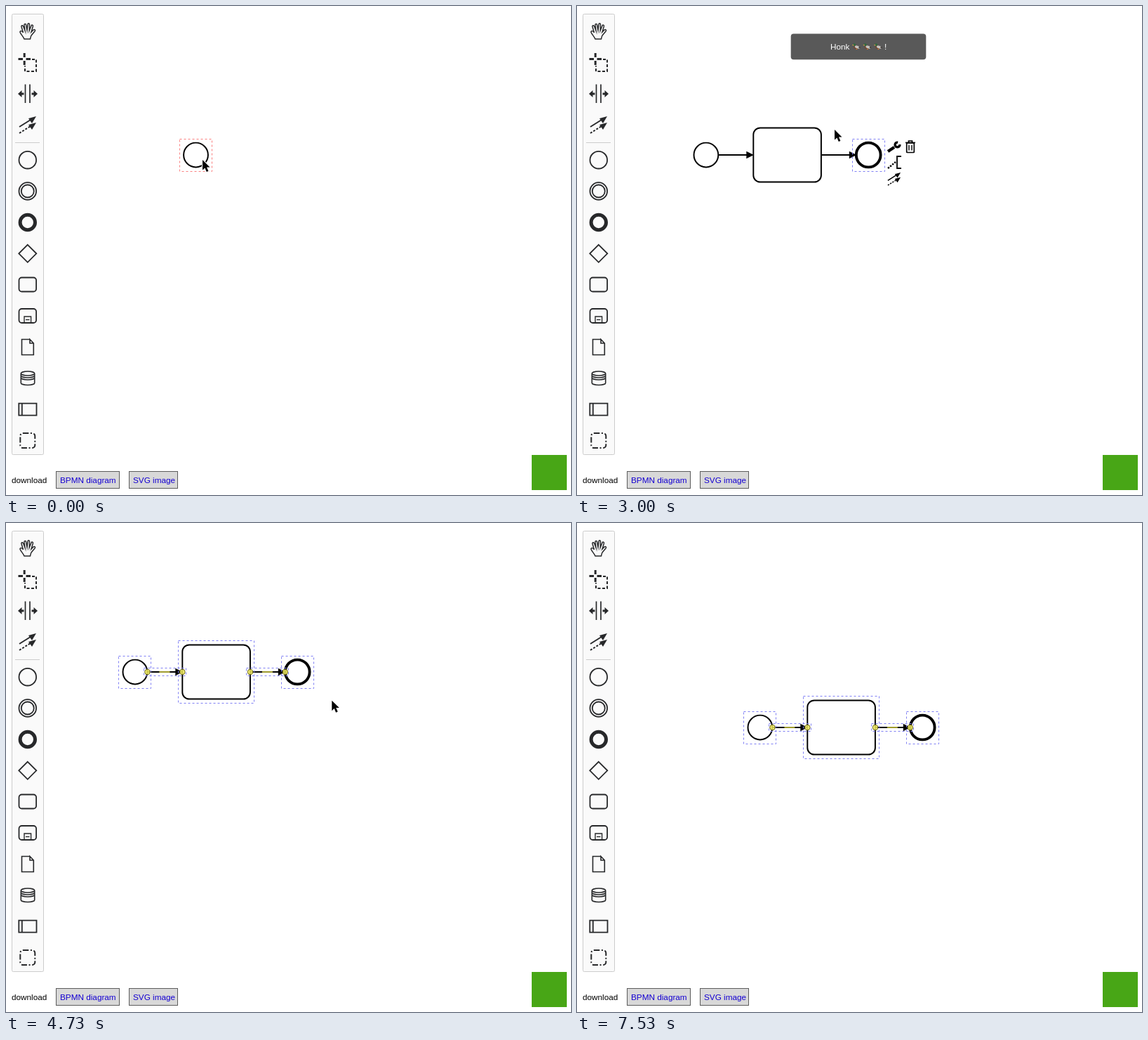
An HTML page with a canvas that plays this animation: 805x696 px, repeating every 7.99 s.

```html
<!DOCTYPE html>
<html lang="en">
<head>
<meta charset="utf-8">
<title>Diagram editor</title>
<style>
  html, body { margin: 0; width: 100%; height: 100%; overflow: hidden; background: #fff; }
  body { font: 11.75px/14px "Liberation Sans", Arial, sans-serif; }
  canvas { position: absolute; left: 0; top: 0; }
  span { position: absolute; white-space: pre; }
  .link { box-sizing: border-box; top: 662px; height: 25px; line-height: 23px; padding-left: 5px;
    border: 1px solid #5c5c5c; background: #d8d8d8; color: #1500d2; }
  .toast { color: #fff; top: 51px; }
</style>
</head>
<body>
<canvas id="stage" width="805" height="696"></canvas>
<span style="left:8px;top:668px">download</span>
<span class="link" style="left:71px;width:91px">BPMN diagram</span>
<span class="link" style="left:175px;width:70px">SVG image</span>
<span class="toast" style="left:361px">Honk</span>
<span class="toast" style="left:438px">!</span>
<script>
const ctx = document.getElementById('stage').getContext('2d');
const toastText = document.querySelectorAll('.toast');
const LOOP = 7990, STEP = 1000 / 15;
const INK = '#27282a', ORANGE = '#f46908', RED = '#fb8080', BLUE = '#8080f4';
const START = { x: 183.9, y: 212, w: 23, h: 23 };
const TASK = { x: 299.6, y: 212, w: 54, h: 44.3 };
const END = { x: 415.2, y: 212, w: 23, h: 23 };

// time, x, y of the pointer; a trailing 1 means constant speed into that point
const TRACK = [
  [0, 280, 219], [60, 280, 219], [610, 187, 222], [980, 187, 222], [1670, 270, 203],
  [2250, 270, 203], [2730, 367, 176], [3640, 367, 176], [3960, 117, 117],
  [4060, 150, 130, 1], [4272, 399, 233, 1], [4338, 443, 248, 1], [4470, 486, 257, 1],
  [4600, 486, 257], [5200, 325, 225], [5405, 354, 256, 1], [5670, 402, 304, 1], [LOOP, 402, 304]
];

function pointerAt(t) {
  const i = Math.max(1, TRACK.findIndex(p => p[0] >= t));
  const a = TRACK[i - 1], b = TRACK[i];
  let p = (t - a[0]) / (b[0] - a[0]);
  if (!b[3]) p = p * p * (3 - 2 * p);
  return { x: a[1] + (b[1] - a[1]) * p, y: a[2] + (b[2] - a[2]) * p };
}

function pen(color, width = 2, dash = []) {
  ctx.strokeStyle = ctx.fillStyle = color;
  ctx.lineWidth = width;
  ctx.setLineDash(dash);
}

function lines(...pts) {
  ctx.beginPath();
  for (let i = 0; i < pts.length; i += 2) ctx.lineTo(pts[i], pts[i + 1]);
}

function line(...pts) { lines(...pts); ctx.stroke(); }

function poly(...pts) { lines(...pts); ctx.closePath(); ctx.fill(); }

function circle(x, y, r) {
  ctx.beginPath();
  ctx.arc(x, y, r, 0, 7);
  ctx.stroke();
}

function box(x, y, w, h, r = 0) {
  ctx.beginPath();
  ctx.roundRect(x, y, w, h, r);
  ctx.stroke();
}

function diamond(x, y, r) {
  lines(x, y - r, x + r, y, x, y + r, x - r, y);
  ctx.closePath();
  ctx.stroke();
}

function at(x, y, draw, scale = 1) {
  ctx.save();
  ctx.translate(x, y);
  ctx.scale(scale, scale);
  draw();
  ctx.restore();
}

/* icons */
const handPath = new Path2D('M7 23C6 20 1 15 1 13C1 11 4 11 5.5 14L3 5.5C2.5 3.5 5 3 5.7 5L8 11L7 3C6.8 1 9.3 .8 9.6 2.8L11 10.5L12 2C12.2 .2 14.6 .4 14.5 2.2L14.2 11L17 4C17.7 2.3 20 3 19.4 5L17 13L20 10C21.5 8.8 23.5 10 22 12L17 18C16 20 16 21 15.5 23Z');

function connectIcon(color) {
  pen(color, 2);
  line(-12, 3, 4, -7);
  poly(12, -12, 6, -2, 1, -9);
  pen(color, 2, [3, 2]);
  line(-12, 12, 4, 2);
  poly(12, -3, 6, 7, 1, 0);
}

function annotationIcon() {
  pen('#000', 1.8);
  line(10, -9, 4, -9, 4, 8, 10, 8);
  pen('#000', 2.4, [2.4, 1.6]);
  line(-9, 8, 2, -1);
}

function wrenchIcon() {
  pen('#000', 4.2);
  line(-9, 7, 0, 1);
  pen('#000', 3.4);
  ctx.beginPath();
  ctx.arc(4.5, -2.5, 3.4, -0.1, 4.9);
  ctx.stroke();
}

function trashIcon() {
  pen('#000', 1.7);
  line(-7, -5.5, 7, -5.5);
  line(-2.5, -6, -2.5, -8, 2.5, -8, 2.5, -6);
  box(-5.3, -5, 10.6, 13.5, 1);
  pen('#000', 1.4);
  for (const x of [-2, 2]) line(x, -2, x, 5.5);
}

function pad(x, y, full) {
  const row = full ? 23 : 0;
  if (full) {
    pen('#000', 3.6); circle(x, y, 7.9);
    pen('#000', 1.4); diamond(x + 23, y, 9.3);
    box(x + 37, y - 7.5, 18, 15, 3);
    circle(x, y + 23, 9); circle(x, y + 23, 6.4);
    at(x + 23, y + 23.5, annotationIcon);
  } else {
    at(x, y + 23, annotationIcon);
  }
  at(x, y + 2 * row, wrenchIcon);
  at(x + 23, y + 2 * row, trashIcon);
  at(x, y + (full ? 69 : 46), () => connectIcon('#000'), 0.76);
}

function palette(lassoOn) {
  ctx.fillStyle = '#fafafa';
  ctx.fillRect(8, 11, 46, 628);
  pen('#ccc', 1);
  box(8.5, 11.5, 45, 627, 2);
  line(13, 194.5, 48, 194.5);

  pen(INK, 1.5);
  at(19, 24, () => ctx.stroke(handPath));

  const c = lassoOn ? ORANGE : INK;
  pen(c, 3);
  line(17.5, 75.5, 24, 75.5); line(28.5, 75.5, 35, 75.5);
  line(26.2, 67, 26.2, 73); line(26.2, 78, 26.2, 84);
  pen(c, 2, [4, 2.5]);
  line(37, 76, 43, 76, 43, 93, 27, 93, 27, 85);

  pen(INK, 1.7);
  line(27.5, 111.5, 27.5, 138); line(34, 111.5, 34, 138);
  pen(INK, 3);
  line(21, 125, 25.5, 125); line(36.5, 125, 41, 125);
  poly(17, 125, 22.5, 120, 22.5, 130);
  poly(45, 125, 39.5, 120, 39.5, 130);

  at(31, 169, () => connectIcon(INK));

  pen(INK, 1.8);
  circle(30.8, 219.2, 12.3);
  circle(30.8, 263.5, 12.3);
  circle(30.8, 263.5, 9);
  diamond(30.8, 352.3, 12.5);
  box(18.5, 386.5, 24.6, 20, 4);
  box(18.5, 431, 24.6, 20, 4);
  pen(INK, 1.4);
  box(26, 442, 9.6, 9);
  line(28, 446.5, 33.5, 446.5);
  pen(INK, 5);
  circle(30.8, 308, 10.7);

  pen(INK, 1.6);
  line(34, 474.5, 22.5, 474.5, 22.5, 496.5, 39.3, 496.5, 39.3, 480, 34, 474.5, 34, 480, 39.3, 480);

  ctx.beginPath();
  ctx.ellipse(31, 523, 9.7, 3, 0, 0, 7);
  ctx.moveTo(21.3, 523);
  ctx.lineTo(21.3, 536.5);
  ctx.ellipse(31, 536.5, 9.7, 3, 0, Math.PI, 0, true);
  ctx.lineTo(40.7, 523);
  for (const y of [526, 529]) {
    ctx.moveTo(21.3, y);
    ctx.ellipse(31, y, 9.7, 3, 0, Math.PI, 0, true);
  }
  ctx.stroke();

  pen(INK, 1.8);
  box(18.3, 565.7, 25.2, 17);
  line(22.8, 565.7, 22.8, 582.7);
  pen(INK, 2, [8, 2.6, 2, 2.6]);
  box(20.3, 608, 21, 21, 4);
}

/* diagram */
function flow(x1, x2, y) {
  line(x1, y, x2 - 6, y);
  poly(x2 + .5, y, x2 - 10, y - 5.3, x2 - 10, y + 5.3);
}

function shapes(count, color, dx = 0, dy = 0, filled = true) {
  const y = 212 + dy;
  const paint = width => {
    pen(color, width);
    if (!filled) return;
    ctx.fillStyle = '#fff';
    ctx.fill();
  };
  const outlineCircle = (x, width) => {
    ctx.beginPath();
    ctx.arc(x, y, 17.4, 0, 7);
    paint(width);
    ctx.stroke();
  };
  outlineCircle(START.x + dx, 1.95);
  if (count > 1) {
    ctx.beginPath();
    ctx.roundRect(251.3 + dx, 173.4 + dy, 96.6, 77.2, 9.7);
    paint(1.95);
    ctx.stroke();
    pen(color, 1.95);
    flow(201.5 + dx, 251.3 + dx, y);
  }
  if (count > 2) {
    outlineCircle(END.x + dx, 3.9);
    pen(color, 1.95);
    flow(348 + dx, 397.8 + dx, y);
  }
}

function frame(el, color, dx = 0, dy = 0) {
  const x = Math.floor(el.x + dx - el.w) + .5, y = Math.floor(el.y + dy - el.h) + .5;
  pen(color, 1, [3, 3]);
  box(x, y, Math.round(el.w * 2), Math.round(el.h * 2));
}

function inside(el, p, inset = 0) {
  return Math.abs(p.x - el.x) <= el.w - inset && Math.abs(p.y - el.y) <= el.h - inset;
}

function selectAll(p, dx, dy, hover) {
  const local = { x: p.x - dx, y: p.y - dy };
  const y = 212 + dy;
  for (const [a, b] of [[201.5, 251.3], [348, 397.8]]) {
    frame({ x: (a + b) / 2, y: 212, w: 30, h: 5.6 }, BLUE, dx, dy);
    pen('#c9c43c', 1.6);
    line((a + b) / 2 + dx - 8, y, (a + b) / 2 + dx + 7, y);
    for (const x of [a, b]) {
      pen('#6e6a24', 1);
      ctx.beginPath();
      ctx.arc(x + dx, y, 3.8, 0, 7);
      ctx.fillStyle = 'rgba(240,234,90,.85)';
      ctx.fill();
      ctx.stroke();
    }
  }
  for (const el of [START, TASK, END])
    frame(el, hover && inside(el, local, 5) ? RED : BLUE, dx, dy);
}

function textBox() {
  ctx.fillStyle = '#fff';
  ctx.fillRect(252, 174, 96, 76);
  pen('#ccc', 1);
  box(252.5, 174.5, 95, 75);
  pen('#000', 1);
  line(300.5, 206, 300.5, 218.5);
}

function toast() {
  ctx.fillStyle = '#595959';
  ctx.beginPath();
  ctx.roundRect(304.7, 39.6, 192.6, 36.6, 4);
  ctx.fill();
  for (const x of [398, 413.5, 429]) at(x, 57.5, duck);
}

function duck() {
  const blob = (color, x, y, w, h) => {
    ctx.fillStyle = color;
    ctx.beginPath();
    ctx.ellipse(x, y, w, h, .25, 0, 7);
    ctx.fill();
  };
  blob('#6d4a38', -1, 1.2, 3, 2.4);
  blob('#c9c5c0', 1.4, 1, 3.6, 1.9);
  blob('#35302e', 4.4, 1.4, 1.3, .9);
  blob('#2f6b3f', -2.6, -2.4, 1.7, 1.7);
  blob('#d8a83c', -4.7, -1.8, 1.1, .6);
  blob('#e07a2c', .4, 3.9, 1, .6);
}

/* pointers */
const arrowPath = new Path2D('M0 0V14.5L3.4 11.4L5.8 17L8.4 15.9L6 10.4H10.5Z');
const fistPath = new Path2D('M-3.5 6.5L-6 2.5C-7 .5-6.2-1-4.6-.6C-5.4-3.4-3.6-5-2.2-4.2C-1.6-5.8.6-5.8 1.2-4.5C2.4-5.6 4-4.8 4.1-3.6C5.6-4 6.4-2.6 6.2-.6C6 2.6 5.2 3.6 4.6 6.5Z');
const pointPath = new Path2D('M-1.2 0C-1.2-1.6 1.2-1.6 1.2 0V5L6 6.2C7.4 6.6 7.4 8 7.2 9L6 15H-1.5L-5.6 9C-6.2 7.6-4.4 6.8-3.2 8L-1.2 9.6Z');

const pointers = {
  arrow() {
    pen('#fff', 2); ctx.stroke(arrowPath);
    ctx.fillStyle = '#000'; ctx.fill(arrowPath);
  },
  fist() {
    pen('#000', 1.3);
    ctx.fillStyle = '#fff'; ctx.fill(fistPath); ctx.stroke(fistPath);
    pen('#000', 1);
    for (const x of [-1.8, .4, 2.6]) line(x, -.8, x, 3);
  },
  point() {
    pen('#000', 1.2);
    ctx.fillStyle = '#fff'; ctx.fill(pointPath); ctx.stroke(pointPath);
  },
  cross() {
    pen('#222', 1.2);
    line(-6, 0, 6, 0); line(0, -6, 0, 6);
  },
  beam() {
    pen('#222', 1.3);
    line(-3.5, -7, -1, -6.6, 0, -5.5, 1, -6.6, 3.5, -7);
    line(-3.5, 7, -1, 6.6, 0, 5.5, 1, 6.6, 3.5, 7);
    line(0, -6, 0, 6); line(-2, 2.5, 2, 2.5);
  }
};

function pointerKind(t, x) {
  if (t < 70) return 'arrow';
  if (t < 730) return 'fist';
  if (t < 1930) return x > 211 ? 'point' : 'arrow';
  if (t < 2930) return x < 345 ? 'beam' : x > 357 ? 'point' : 'arrow';
  if (t < 3670) return 'arrow';
  if (t < 4600) return 'cross';
  if (t >= 5270 && t < 5730) return 'fist';
  return t < 7470 ? 'arrow' : null;
}

function faded(draw) {
  ctx.globalAlpha = .35;
  draw();
  ctx.globalAlpha = 1;
}

function lasso(corner) {
  const w = corner.x - 117, h = corner.y - 117;
  ctx.fillStyle = 'rgba(255,102,0,.1)';
  ctx.fillRect(117, 117, w, h);
  pen('#ee7d1e', 1.2, [3, 1]);
  box(117.5, 117.5, Math.round(w), Math.round(h));
}

function scene(t, p) {
  const home = 86.6;
  if (t < 70) {
    shapes(1, '#000', home);
    frame(START, RED, home);
  } else if (t < 730) {
    faded(() => shapes(1, '#000', home));
    shapes(1, ORANGE, home + (p.x - 280) * home / 93, 0, false);
    pen('rgba(255,180,50,.55)', 1.9);
    line(0, 211.8, 805, 211.8);
  } else if (t < 1930) {
    shapes(1, '#000');
    frame(START, inside(START, p, 5) ? RED : BLUE);
    pad(221, 200, true);
  } else if (t < 2930) {
    shapes(2, '#000');
    textBox();
    frame(TASK, p.x > 345 && p.x < 355 ? RED : BLUE);
    pad(367, 178.5, true);
  } else if (t < 3670) {
    shapes(3, '#000');
    frame(END, BLUE);
    pad(452, 200, false);
  } else if (t < 4600) {
    const corner = pointerAt(t - STEP);
    shapes(3, '#000');
    if (t > 4020) {
      lasso(corner);
      for (const el of [TASK, END]) if (inside(el, corner)) frame(el, RED);
    }
  } else if (t < 5270) {
    shapes(3, '#000');
    selectAll(p, 0, 0, true);
  } else if (t < 5730) {
    faded(() => shapes(3, '#000'));
    shapes(3, ORANGE, p.x - 325, p.y - 225, false);
  } else {
    shapes(3, '#000', 77, 79);
    selectAll(p, 77, 79, t < 7530);
  }
}

function render(now) {
  const clock = now % LOOP;
  // screen updates come in fifteenths of a second
  const t = Math.floor((clock + 4) / STEP) * STEP + 5;
  const p = pointerAt(Math.min(t, LOOP));

  ctx.fillStyle = '#fff';
  ctx.fillRect(0, 0, 805, 696);
  scene(t, p);
  palette(t >= 3530 && t < 4020);
  ctx.fillStyle = '#48a616';
  ctx.fillRect(749, 639, 50, 50);

  const honk = [[730, 1200], [1930, 2400], [2930, 3400], [5730, 6200]]
    .some(([from, to]) => t >= from && t < to);
  if (honk) toast();
  for (const el of toastText) el.style.visibility = honk ? 'visible' : 'hidden';

  const kind = pointerKind(t, p.x);
  if (kind) at(p.x, p.y, () => pointers[kind]());
}

const begin = performance.now();
function tick() {
  render(performance.now() - begin);
  requestAnimationFrame(tick);
}
tick();
</script>
</body>
</html>
```
